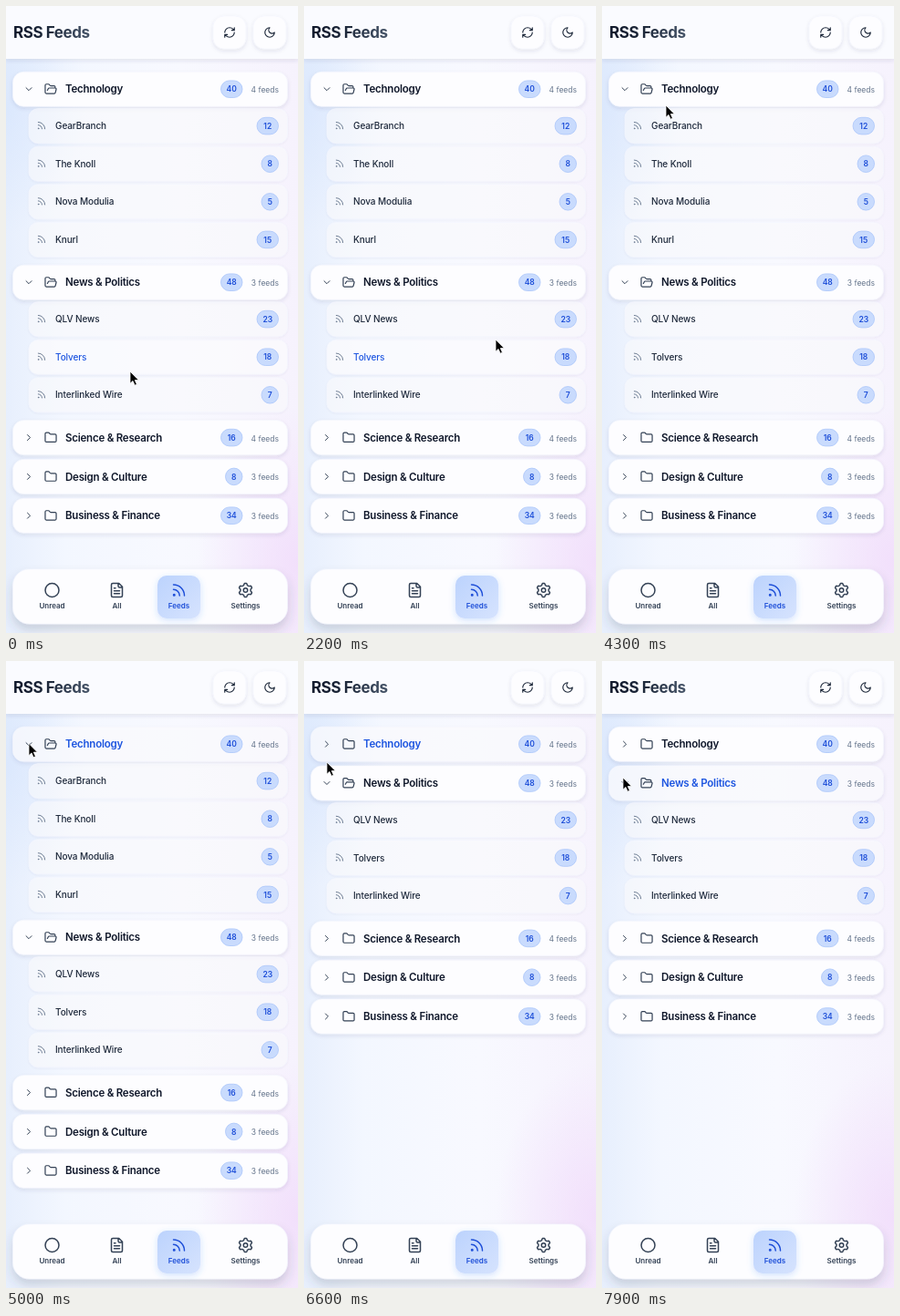
Recreate the animation shown at these times as an HTML page. Size 320x688 px, loop 8 s.

```html
<!DOCTYPE html>
<html lang="en">
<head>
<meta charset="utf-8">
<title>RSS Feeds</title>
<style>
  html, body { margin: 0; width: 100%; height: 100%; overflow: hidden; background: #f6f8ff; }
  svg { display: block; }
  #stage { width: 100vw; height: 100vh; font-family: Inter, Roboto, sans-serif; }
  .icon { fill: none; stroke: currentColor; stroke-linecap: round; stroke-linejoin: round; }
  .card { fill: #fdfdff; stroke: #f3f5fd; stroke-width: .6; filter: url(#soft); }
  .row { color: #334155; }
  .row .name { fill: #0f172a; }
  .row.hover .name { fill: #1d55e0; }
  .row.hover .card { fill-opacity: .75; }
  .category .name { font-size: 11.5px; font-weight: 600; letter-spacing: -.22px; }
  .feed .name { font-size: 10px; font-weight: 500; letter-spacing: -.1px; fill: #1e293b; }
  .feed .icon { color: #64748b; }
  .feed .card { fill-opacity: .55; filter: url(#faint); }
  .total { font-size: 8.5px; fill: #64748b; text-anchor: end; }
  .badge rect { fill: #c9dbfd; stroke: #aac6fa; stroke-width: .8; }
  .badge text { font-size: 8.5px; font-weight: 600; fill: #1d4ed8; text-anchor: middle; }
  .nav { filter: url(#lift); }
  .tab { color: #334155; }
  .tab text { font-size: 8px; font-weight: 600; fill: currentColor; text-anchor: middle; }
  .tab.active { color: #1d4ed8; }
  .title { font-size: 17px; font-weight: 700; letter-spacing: -.42px; fill: url(#ink); }
</style>
</head>
<body>
<svg id="stage" viewBox="0 0 320 688" preserveAspectRatio="none">
  <defs>
    <linearGradient id="page" x2="1">
      <stop offset="0" stop-color="#e7effd"/><stop offset=".2" stop-color="#f3f7ff"/>
      <stop offset=".6" stop-color="#f8f9ff"/><stop offset="1" stop-color="#f6f2fd"/>
    </linearGradient>
    <linearGradient id="ink" gradientUnits="userSpaceOnUse" x1="8" x2="92">
      <stop offset="0" stop-color="#0f172a"/><stop offset=".45" stop-color="#1e293b"/>
      <stop offset="1" stop-color="#475569"/>
    </linearGradient>
    <linearGradient id="active" x2="1" y2="1">
      <stop offset="0" stop-color="#bcd3fd"/><stop offset="1" stop-color="#d6e3fe"/>
    </linearGradient>
    <radialGradient id="blue"><stop stop-color="#d6e5fd" stop-opacity=".7"/><stop offset="1" stop-color="#d6e5fd" stop-opacity="0"/></radialGradient>
    <radialGradient id="violet"><stop stop-color="#f1dcfb" stop-opacity=".85"/><stop offset="1" stop-color="#f1dcfb" stop-opacity="0"/></radialGradient>
    <filter id="soft" x="-20%" y="-30%" width="140%" height="180%">
      <feDropShadow dx="0" dy="2" stdDeviation="2.2" flood-color="#334155" flood-opacity=".11"/>
    </filter>
    <filter id="faint" x="-10%" y="-20%" width="120%" height="150%">
      <feDropShadow dx="0" dy="1" stdDeviation="1" flood-color="#334155" flood-opacity=".07"/>
    </filter>
    <filter id="lift" x="-20%" y="-40%" width="140%" height="200%">
      <feDropShadow dx="0" dy="7" stdDeviation="6" flood-color="#334155" flood-opacity=".2"/>
    </filter>
    <filter id="glow" x="-40%" y="-40%" width="180%" height="180%">
      <feDropShadow dx="0" dy="2" stdDeviation="3.5" flood-color="#3b82f6" flood-opacity=".22"/>
    </filter>
  </defs>
  <rect width="320" height="688" fill="url(#page)"/>
  <ellipse cx="0" cy="110" rx="90" ry="140" fill="url(#blue)"/>
  <ellipse cx="320" cy="610" rx="110" ry="170" fill="url(#violet)"/>
  <g id="list"></g>
  <rect width="320" height="58" fill="#fafbff" filter="url(#soft)"/>
  <text class="title" x="8" y="34.5">RSS Feeds</text>
  <g id="chrome"></g>
  <path id="cursor" d="M0 0V13.2L3 10.4L5.1 15.2L7.4 14.2L5.3 9.6H9.4Z" fill="#000" stroke="#fff" stroke-width=".8" stroke-linejoin="round"/>
</svg>
<script>
const LOOP = 8000, STEP = 100, COLLAPSE_AT = 6000;

const categories = [
  { name: 'Technology', unread: 40, total: 4, open: true,
    feeds: [['GearBranch', 12], ['The Knoll', 8], ['Nova Modulia', 5], ['Knurl', 15]] },
  { name: 'News & Politics', unread: 48, total: 3, open: true,
    feeds: [['QLV News', 23], ['Tolvers', 18], ['Interlinked Wire', 7]] },
  { name: 'Science & Research', unread: 16, total: 4, feeds: [] },
  { name: 'Design & Culture', unread: 8, total: 3, feeds: [] },
  { name: 'Business & Finance', unread: 34, total: 3, feeds: [] }
];

// Pointer path: time, x, y
const pointerPath = [
  [0, 136, 401], [500, 136, 401], [1100, 112, 168], [1200, 110, 117], [1400, 112, 104],
  [2100, 208, 372], [2200, 210, 366], [2900, 205, 364], [4200, 71, 111.5], [4300, 70, 109],
  [4800, 25, 91], [5600, 25, 88], [6200, 25, 90], [6500, 25, 105], [6600, 25, 111],
  [7000, 24, 130], [7900, 23, 128], [8000, 23, 128]
];

function gearPath() {
  const points = Array.from({ length: 72 }, (_, i) => {
    const angle = i * Math.PI / 36;
    const radius = 8.7 + 1.3 * Math.tanh(2.5 * Math.cos(6 * angle));
    return `${(12 + radius * Math.sin(angle)).toFixed(2)} ${(12 - radius * Math.cos(angle)).toFixed(2)}`;
  });
  return `M${points.join('L')}Z`;
}

const ring = r => `M${12 - r} 12a${r} ${r} 0 1 0 ${2 * r} 0a${r} ${r} 0 1 0 ${-2 * r} 0`;
const icons = {
  refresh: 'M3 12a9 9 0 0 1 9-9 9.75 9.75 0 0 1 6.74 2.74L21 8M21 3v5h-5M21 12a9 9 0 0 1-9 9 9.75 9.75 0 0 1-6.74-2.74L3 16M8 16H3v5',
  moon: 'M12 3a6 6 0 0 0 9 9 9 9 0 1 1-9-9Z',
  down: 'm6 9 6 6 6-6',
  right: 'm9 18 6-6-6-6',
  folder: 'M20 20a2 2 0 0 0 2-2V8a2 2 0 0 0-2-2h-7.9a2 2 0 0 1-1.69-.9L9.6 3.9A2 2 0 0 0 7.93 3H4a2 2 0 0 0-2 2v13a2 2 0 0 0 2 2Z',
  folderOpen: 'm6 14 1.5-2.9A2 2 0 0 1 9.24 10H20a2 2 0 0 1 1.94 2.5l-1.54 6a2 2 0 0 1-1.95 1.5H4a2 2 0 0 1-2-2V5a2 2 0 0 1 2-2h3.9a2 2 0 0 1 1.69.9l.81 1.2a2 2 0 0 0 1.67.9H18a2 2 0 0 1 2 2v2',
  rss: 'M4 11a9 9 0 0 1 9 9M4 4a16 16 0 0 1 16 16M4 19a1 1 0 1 0 2 0a1 1 0 1 0-2 0',
  circle: ring(10),
  file: 'M15 2H6a2 2 0 0 0-2 2v16a2 2 0 0 0 2 2h12a2 2 0 0 0 2-2V7ZM14 2v4a2 2 0 0 0 2 2h4M10 9H8M16 13H8M16 17H8',
  gear: gearPath() + ring(3)
};

const icon = (name, x, y, size, weight = 2) =>
  `<path class="icon" d="${icons[name]}" stroke-width="${weight}" transform="translate(${x - size / 2} ${y - size / 2}) scale(${size / 24})"/>`;

const card = (x, y, w, h, r, extra = '') =>
  `<rect class="card ${extra}" x="${x}" y="${y}" width="${w}" height="${h}" rx="${r}"/>`;

function badge(count, right) {
  const width = count > 9 ? 23.5 : 18.5;
  return `<g class="badge"><rect x="${right - width}" y="-9.3" width="${width}" height="18.6" rx="9.3"/>
    <text x="${right - width / 2}" y="3.1">${count}</text></g>`;
}

const text = (name, x, y) => `<text class="name" x="${x}" y="${y}">${name.replace('&', '&amp;')}</text>`;

const categoryBody = (c, open) => card(7.5, -19, 301, 38, 12)
  + icon(open ? 'down' : 'right', 25, 0, 12) + icon(open ? 'folderOpen' : 'folder', 49, 0, 14.5)
  + text(c.name, 65, 4.2) + badge(c.unread, 259)
  + `<text class="total" x="299" y="3.9">${c.total} feeds</text>`;

const feedBody = ([name, unread]) => card(25, -19, 283.5, 38, 10)
  + icon('rss', 39, -.5, 11) + text(name, 54, 3.6) + badge(unread, 298.5);

const list = document.getElementById('list');
const cursor = document.getElementById('cursor');

function buildRows(technologyOpen) {
  const rows = [];
  let y = 91.2;
  categories.forEach((c, i) => {
    const open = i === 0 ? technologyOpen : c.open;
    rows.push({ y, left: 7.5, kind: 'category', body: categoryBody(c, open) });
    if (!open) { y += 42.8; return; }
    c.feeds.forEach((feed, k) => {
      y += k ? 41.6 : 40.4;
      rows.push({ y, left: 25, kind: 'feed', body: feedBody(feed) });
    });
    y += 46.8;
  });
  const group = document.createElementNS('http://www.w3.org/2000/svg', 'g');
  group.innerHTML = rows.map(r =>
    `<g class="row ${r.kind}" transform="translate(0 ${r.y.toFixed(1)})">${r.body}</g>`).join('');
  list.append(group);
  rows.forEach((r, i) => r.node = group.children[i]);
  return { group, rows };
}

const tab = (name, label, x, active) => `<g class="tab${active ? ' active' : ''}">
  ${active ? '<rect x="166" y="625" width="47" height="47" rx="10" fill="url(#active)" filter="url(#glow)"/>' : ''}
  ${icon(name, x, 641, 18)}<text x="${x}" y="661">${label}</text></g>`;

document.getElementById('chrome').innerHTML =
  `<g color="#1e293b">${card(227, 11, 36, 36, 12)}${icon('refresh', 245, 29, 14)}
   ${card(271, 11, 36, 36, 12)}${icon('moon', 289, 29, 14)}</g>`
  + card(7.5, 618, 301, 60, 18, 'nav')
  + tab('circle', 'Unread', 50.5, false) + tab('file', 'All', 121.5, false)
  + tab('rss', 'Feeds', 189.5, true) + tab('gear', 'Settings', 262.5, false);

const expanded = buildRows(true), collapsed = buildRows(false);

function pointerAt(time) {
  const i = Math.max(1, pointerPath.findIndex(p => p[0] >= time));
  const [t0, x0, y0] = pointerPath[i - 1], [t1, x1, y1] = pointerPath[i];
  const u = (time - t0) / (t1 - t0), ease = u * u * (3 - 2 * u);
  return [x0 + (x1 - x0) * ease, y0 + (y1 - y0) * ease];
}

function draw(time) {
  const [x, y] = pointerAt(time);
  cursor.setAttribute('transform', `translate(${x.toFixed(1)} ${y.toFixed(1)})`);
  const shown = time < COLLAPSE_AT ? expanded : collapsed;
  expanded.group.style.display = shown === expanded ? '' : 'none';
  collapsed.group.style.display = shown === collapsed ? '' : 'none';
  // Hover styling trails the pointer by one step.
  const [hx, hy] = pointerAt(Math.max(0, time - STEP));
  shown.rows.forEach(r =>
    r.node.classList.toggle('hover', hx >= r.left && hx < 308 && Math.abs(hy - r.y) < 19.5));
}

const start = performance.now();
function tick() {
  const time = (performance.now() - start) % LOOP;
  draw(Math.floor(time / STEP) * STEP);
  requestAnimationFrame(tick);
}
tick();
</script>
</body>
</html>
```
